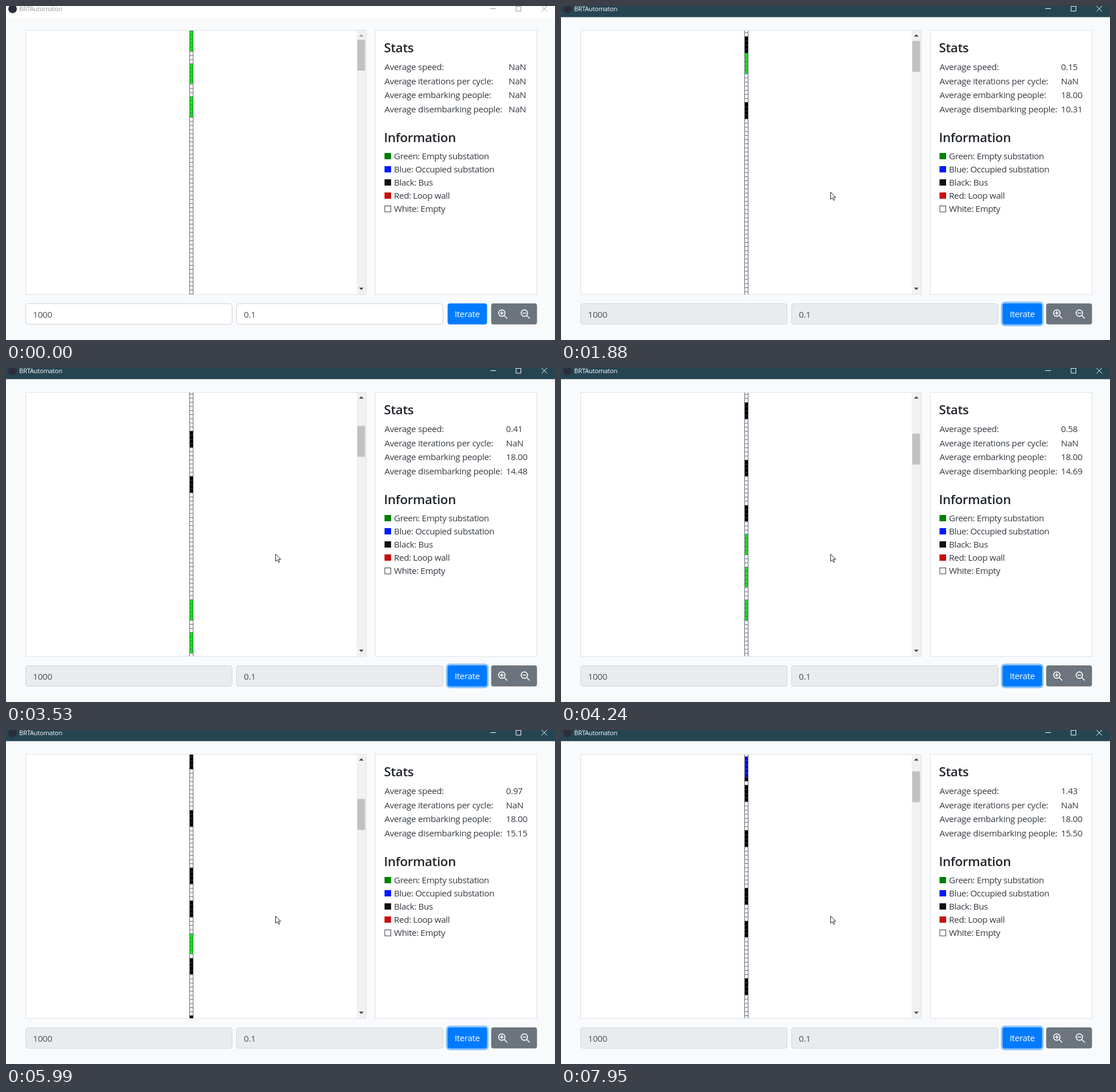
Write an HTML page with a canvas that moves like this. It is 958x584 px and loops after 8000 ms.

```html
<!DOCTYPE html>
<html lang="en">
<head>
<meta charset="utf-8">
<title>BRTAutomaton</title>
<style>
html, body { margin: 0; width: 100%; height: 100%; overflow: hidden; background: #f8fafc; }
#stage { position: relative; width: 958px; height: 584px; overflow: hidden; }
svg { position: absolute; left: 0; top: 0; display: block; }
canvas { position: absolute; left: 320px; top: 43px; }
text { font: 15.2px "Open Sans", "Noto Sans", sans-serif; letter-spacing: -.3px; fill: #343a40; white-space: pre; }
.head { font-size: 22.3px; font-weight: 600; letter-spacing: -.35px; fill: #212529; }
.legend text { letter-spacing: -.39px; }
.title { font-size: 11px; letter-spacing: -.15px; }
.input { fill: #495057; }
.label { fill: #fff; letter-spacing: -.4px; font-weight: 500; }
.panel { fill: #fff; stroke: #dee2e6; }
.icon { fill: none; stroke: #fff; stroke-width: 1.6; stroke-linecap: round; }

.bar, .title, .chrome, .field, .button, .ring, .cursor, .arrow, .hand {
  animation: 8s step-end infinite;
}
.bar { animation-name: bar; }
.title { animation-name: title; }
.chrome { animation-name: chrome; fill: none; }
.field { animation-name: field; stroke: #ced4da; }
.button { animation-name: button; }
.ring { animation-name: ring; }
.cursor { animation-name: move; animation-timing-function: ease-in-out; }
.arrow { animation-name: arrow; }
.hand { animation-name: hand; }
@keyframes bar { 0% { fill: #fff } 11.5%, 100% { fill: #254552 } }
@keyframes title { 0% { fill: #999 } 11.5%, 100% { fill: #fff } }
@keyframes chrome { 0% { stroke: #999 } 11.5%, 100% { stroke: #fff } }
@keyframes field { 0% { fill: #fff } 11.5%, 100% { fill: #e9ecef } }
@keyframes button { 0% { fill: #007bff } 6.625% { fill: #0069d9 } 14.5%, 100% { fill: #007bff } }
@keyframes ring { 0% { opacity: 0 } 11.5%, 100% { opacity: 1 } }
@keyframes arrow { 0% { opacity: 0 } 3.625% { opacity: 1 } 6.625% { opacity: 0 } 14.5%, 100% { opacity: 1 } }
@keyframes hand { 0% { opacity: 0 } 6.625% { opacity: 1 } 14.5%, 100% { opacity: 0 } }
@keyframes move {
  0%, 3.625% { transform: translate(889px, 577px) }
  7.625%, 12.6% { transform: translate(807px, 536px) }
  18.5%, 100% { transform: translate(470px, 325px) }
}
</style>
</head>
<body>
<div id="stage">
<svg width="958" height="584" viewBox="0 0 958 584">
  <rect class="bar" width="958" height="19.500"/>
  <circle cx="11.5" cy="5" r="7.5" fill="#2b2e3a"/>
  <text class="title" x="23" y="9">BRTAutomaton</text>
  <path class="chrome" d="M845 4.5h10M890 .5h8.5v8.500h-8.500zM934.500 0l9.500 9.500M944 0l-9.500 9.500"/>

  <rect class="panel" x="34.500" y="42.500" width="594" height="462"/>
  <rect x="612" y="43" width="16" height="461" fill="#f1f1f1"/>
  <path id="up" d="M616 53.500l4-4 4 4z"/>
  <path d="M616 492.500l4 4 4-4z" fill="#404040"/>
  <rect id="thumb" x="613" y="59" width="13.500" height="54" fill="#c1c1c1"/>

  <rect class="panel" x="644.500" y="42.500" width="282" height="462"/>
  <text class="head" x="659.500" y="81">Stats</text>
  <text x="660.500" y="112">Average speed:</text>
  <text x="660.500" y="136.600">Average iterations per cycle:</text>
  <text x="660.500" y="161.200">Average embarking people:</text>
  <text x="660.500" y="185.800">Average disembarking people:</text>
  <g id="values">
    <text y="112"></text>
    <text y="136.600"></text>
    <text y="161.200"></text>
    <text y="185.800"></text>
  </g>
  <text class="head" x="659.500" y="238">Information</text>
  <g class="legend">
    <rect x="660.500" y="257" width="11.500" height="11" fill="#008000"/>
    <text x="677" y="268">Green: Empty substation</text>
    <rect x="660.500" y="280" width="11.500" height="11" fill="#001aff"/>
    <text x="677" y="291">Blue: Occupied substation</text>
    <rect x="660.500" y="303" width="11.500" height="11" fill="#111"/>
    <text x="677" y="314">Black: Bus</text>
    <rect x="660.500" y="326" width="11.500" height="11" fill="#c80f0f"/>
    <text x="677" y="337">Red: Loop wall</text>
    <rect x="661" y="349.500" width="10.500" height="10.500" fill="#fff" stroke="#343a40"/>
    <text x="677" y="360">White: Empty</text>
  </g>

  <rect class="field" x="34.500" y="520.500" width="360" height="36" rx="4"/>
  <text class="input" x="47" y="545">1000</text>
  <rect class="field" x="402.500" y="520.500" width="360" height="36" rx="4"/>
  <text class="input" x="415" y="545">0.1</text>
  <rect class="ring" x="767.700" y="516.800" width="74.500" height="43.200" rx="7" fill="#8fc5fe"/>
  <rect class="button" x="770.600" y="520" width="68.800" height="36.700" rx="4"/>
  <text class="label" x="783" y="544">Iterate</text>
  <rect x="846.600" y="520" width="80" height="36.700" rx="4" fill="#6c757d"/>
  <g class="icon">
    <g id="lens"><circle cx="865.200" cy="537" r="5.600"/><path d="M869.500 541.300l4.700 4.700M862.500 537h5.400"/></g>
    <path d="M865.200 534.300v5.400"/>
    <use href="#lens" x="39.300"/>
  </g>
</svg>
<canvas id="lane" width="8" height="461"></canvas>
<svg width="958" height="584" viewBox="0 0 958 584">
  <g class="cursor" stroke="#222" stroke-linejoin="round" fill="#fff">
    <path class="arrow" d="M.5 .5v12.500l3-2.700 2 4.500 2-.9-2-4.400h3.800z"/>
    <path class="hand" d="M-1.500 1.500q1.500-2.500 3 0v5l5.500 1.500q1.500.5 1.500 2.500-.5 4-2 7.500h-6.500q-1.500-3.500-4.500-6.500 0-2 3 0z"/>
  </g>
</svg>
</div>
<script>
const LOOP = 8000, FIRST = 290, TICK = 79;
const CLICK = 915, COUNTING = 1465, BOARDING = 1630;
const CELL = 7.19, VIEW = 461, BUS = 4, STATION = 5;
const STATIONS = [0, 100].flatMap(zone => [zone, zone + 8, zone + 16]);

// Key points alternate time and value.
const SCROLL = [1780, 0, 4090, 472, 5050, 472, 5600, 521.5, 7400, 521.5, 7950, 112];
const SPEED = [920, .04, 2660, .24, 3530, .41, 5030, .76, 7000, 1.2, 7950, 1.43];
const LEAVING = [1480, 9, 2660, 12.96, 3530, 14.48, 5030, 14.93, 7000, 15.39, 7950, 15.5];
const LEADER = [1800, 18, 2660, 46, 3530, 70, 5030, 118, 6000, 150];
const CONVOY = [1800, -15, 2660, 31, 5030, 107, 7000, 167, 7950, 192];

const pen = document.getElementById("lane").getContext("2d");
const up = document.getElementById("up");
const thumb = document.getElementById("thumb");
const values = [...document.querySelectorAll("#values text")];

function at(keys, t) {
  if (t <= keys[0]) return keys[1];
  for (let i = 2; i < keys.length; i += 2) {
    if (t <= keys[i]) {
      const p = (t - keys[i - 2]) / (keys[i] - keys[i - 2]);
      return keys[i - 1] + p * (keys[i + 1] - keys[i - 1]);
    }
  }
  return keys[keys.length - 1];
}

function snap(t) {
  return Math.max(0, FIRST + Math.floor((t - FIRST + 12) / TICK) * TICK);
}

// Buses follow in groups of three and start slowly out of the first stations.
function busTails(t) {
  if (t < BOARDING) return [];
  const tails = [Math.round(at(LEADER, t))];
  const front = at(CONVOY, t);
  for (let n = 0; ; n++) {
    const x = front - 36 * Math.floor(n / 3) - 14 * (n % 3);
    const tail = Math.round(x < 28 ? x + .4 * (28 - x) : x);
    if (tail < 0) return tails;
    tails.push(tail);
  }
}

function lane(t) {
  const cells = {};
  const paint = (from, count, color) => {
    for (let i = from; i < from + count; i++) cells[i] = color;
  };
  const tails = busTails(t);
  tails.forEach(tail => paint(tail, BUS, "#000"));
  for (const s of STATIONS) {
    const gaps = tails.map(tail => tail - s).filter(d => d > -BUS && d < STATION);
    const parked = gaps.includes(2);
    if (!gaps.length || parked || gaps.includes(-1)) {
      paint(s, STATION, parked && s < 100 ? "#0000f5" : "#08ea12");
    }
  }
  return cells;
}

function drawLane(cells, scroll) {
  pen.clearRect(0, 0, 8, VIEW);
  const first = Math.floor(scroll / CELL), last = Math.ceil((scroll + VIEW) / CELL);
  for (let i = first; i < last; i++) {
    const y = i * CELL - scroll;
    pen.fillStyle = cells[i] || "#fff";
    pen.fillRect(0, Math.round(y), 7, CELL + 1);
    pen.fillStyle = cells[i] === "#000" ? "#444a52" : "#5c6470";
    pen.fillRect(0, y, 7, 1);
    pen.fillRect(0, y, 1, CELL);
    pen.fillRect(6, y, 1, CELL);
  }
}

function drawStats(t) {
  const counting = t >= COUNTING;
  const texts = [
    t >= CLICK ? at(SPEED, t).toFixed(2) : "NaN",
    "NaN",
    counting ? "18.00" : "NaN",
    counting ? at(LEAVING, t).toFixed(2) : "NaN"
  ];
  values.forEach((el, i) => {
    el.setAttribute("x", counting ? 872.5 : 877);
    el.textContent = texts[i];
  });
}

function draw(t) {
  const scroll = at(SCROLL, t);
  drawLane(lane(t), scroll);
  drawStats(t);
  thumb.setAttribute("y", 59 + scroll / 8.47);
  up.setAttribute("fill", scroll > 0 ? "#404040" : "#a0a0a0");
}

let start;
function frame(now) {
  start ??= now;
  draw(snap((now - start) % LOOP));
  requestAnimationFrame(frame);
}
draw(0);
requestAnimationFrame(frame);
</script>
</body>
</html>
```
